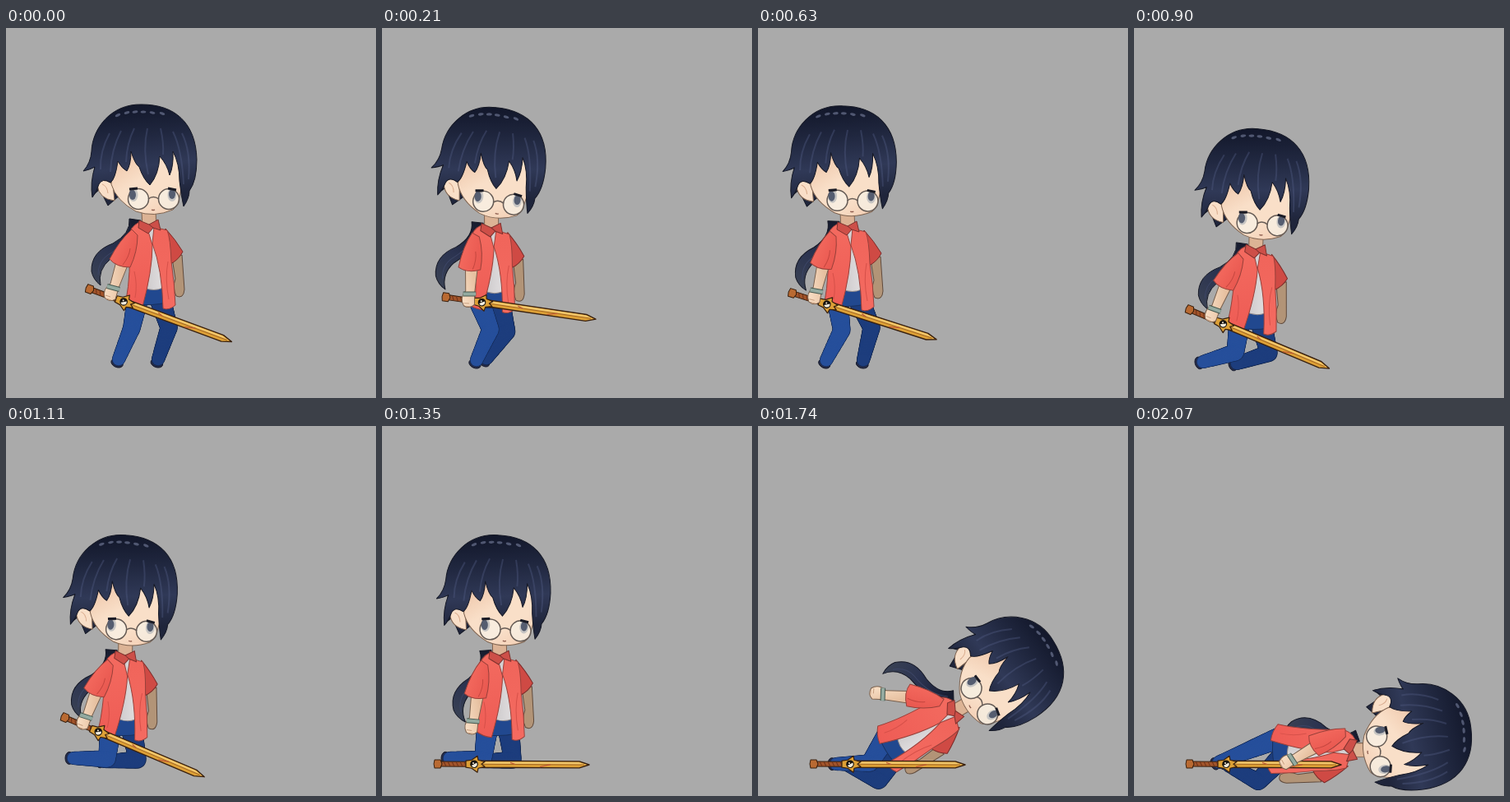
An HTML page with a canvas for the animation above (2.1 s loop, 450 by 450 pixels).

```html
<!DOCTYPE html>
<html lang="en">
<head>
<meta charset="utf-8">
<title>Swordsman falls</title>
<style>
html, body { margin: 0; overflow: hidden; background: #aaa; }
canvas { display: block; width: 100vw; height: 100vh; }
</style>
</head>
<body>
<canvas id="stage" width="450" height="450"></canvas>
<script>
const ctx = document.getElementById('stage').getContext('2d');
const LOOP = 2100, STEP = 30, RAD = Math.PI / 180;

// time, collar x, y, torso turn, head turn, arm turn, tail turn, near ankle x, y, far ankle x, y
const BODY = [
  [0, 174, 238, 0, 0, 0, 0, 137, 403, 185, 403],
  [210, 133, 242, 2, 6, -15, -2, 115, 404, 127, 402],
  [555, 104, 240, 0, 1, -4, -4, 80, 404, 126, 404],
  [630, 109, 240, 0, 1, -5, -6, 83, 404, 128, 404],
  [900, 148, 268, 4, 5, 5, 0, 84, 406, 125, 408],
  [1110, 145, 278, 3, 4, 3, -4, 82, 404, 119, 408],
  [1350, 143, 278, 1, 3, -10, -12, 82, 404, 118, 408],
  [1620, 155, 283, 12, 13, -4, -6, 83, 404, 117, 408],
  [1740, 241, 346, 62, 58, 77, 80, 95, 411, 110, 413],
  [2070, 267, 394, 92, 83, 42, 62, 103, 409, 115, 413]
];
// time, pommel x, y, turn
const SWORD = [
  [0, 100, 317, 20.3],
  [60, 104, 322, 9],
  [210, 76, 327, 8.4],
  [555, 31, 321, 18],
  [630, 40, 322, 17.8],
  [900, 66, 342, 22.8],
  [1110, 70, 354, 23],
  [1200, 66, 411, 0.3]
];

// Monotone cubic interpolation: smooth, never beyond the keys.
function pose(keys, t) {
  const last = keys.length - 1;
  if (t >= keys[last][0]) return keys[last].slice(1);
  const i = keys.findIndex(k => k[0] > t) - 1;
  const a = keys[i], b = keys[i + 1], h = b[0] - a[0], u = (t - a[0]) / h;
  const rate = (n, c) => (keys[n + 1][c] - keys[n][c]) / (keys[n + 1][0] - keys[n][0]);
  const slope = (n, c) => {
    if (n === 0 || n === last) return 0;
    const p = rate(n - 1, c), q = rate(n, c);
    return p * q > 0 ? 2 * p * q / (p + q) : 0;
  };
  return a.slice(1).map((v, j) => {
    const c = j + 1, s = u * u * (3 - 2 * u);
    return v + (b[c] - v) * s + h * u * (1 - u) * ((1 - u) * slope(i, c) - u * slope(i + 1, c));
  });
}

function fill(d, color, edge, width = 1) {
  const p = new Path2D(d);
  ctx.fillStyle = color;
  ctx.fill(p);
  if (edge) line(p, edge, width);
}
function line(d, color, width = 1) {
  ctx.strokeStyle = color;
  ctx.lineWidth = width;
  ctx.stroke(d instanceof Path2D ? d : new Path2D(d));
}
function oval(x, y, rx, ry, color, edge, width = 1, turn = 0) {
  ctx.beginPath();
  ctx.ellipse(x, y, rx, ry, turn, 0, 7);
  if (color) { ctx.fillStyle = color; ctx.fill(); }
  if (edge) { ctx.strokeStyle = edge; ctx.lineWidth = width; ctx.stroke(); }
}
function shade(x0, y0, x1, y1, ...colors) {
  const g = ctx.createLinearGradient(x0, y0, x1, y1);
  colors.forEach((c, i) => g.addColorStop(i / (colors.length - 1), c));
  return g;
}
// Draws a part so that its rest pivot lands on (x, y), turned.
function part(pivot, [x, y], turn, draw) {
  ctx.save();
  ctx.translate(x, y);
  ctx.rotate(turn * RAD);
  ctx.translate(-pivot[0], -pivot[1]);
  draw();
  ctx.restore();
}

function tail() {
  fill('M150 232 Q152 250 130 262 Q103 272 104 296 Q106 306 115 313 Q111 294 127 281 Q160 262 164 234Z',
    shade(155, 235, 110, 310, '#171c2f', '#2b3350', '#3a4254'), '#141724');
  line('M156 240 Q150 262 124 276 Q112 284 112 300', '#3c4566');
}

function farArm() {
  fill('M202 280 L206 305 Q202 316 207 326 Q216 330 217 318 L214 276Z', '#b29477', '#5f4a3c');
  fill('M194 244 Q206 257 215 272 Q210 282 200 287 L190 262Z', '#cf4a44', '#7c2c2a');
}

function nearArm() {
  fill('M134 284 L127 311 Q117 318 120 328 Q126 334 133 330 L137 316 L149 286Z',
    shade(122, 300, 142, 300, '#f7dcc2', '#e6c0a0'), '#79604d');
  line('M121 325 L127 327 M122 329 L128 331', '#c79f80');
  line('M123 314 L138 318', '#46584f', 6);
  line('M123 314 L138 318', '#93aaa0', 4);
  fill('M153 245 Q138 258 126 281 Q134 291 151 291 Q160 272 160 252Z',
    shade(130, 260, 160, 275, '#f56c60', '#e8574f'), '#98403a');
  line('M142 288 Q150 278 151 268', '#c4463f');
}

function torso() {
  fill('M160 312 H194 L195 334 Q178 338 158 336Z', '#21488f', '#17305f');
  fill('M165 222 H182 L183 246 H166Z', '#dcb395', '#7e6350');
  fill('M164 242 L184 242 L191 316 Q180 321 168 316Z', shade(165, 0, 192, 0, '#c9c6c8', '#e2dfe0'), '#8c8688');
  fill('M162 236 Q150 242 150 254 Q152 300 146 331 Q155 338 166 339 Q178 295 178 264 L172 244Z',
    shade(150, 245, 170, 335, '#f36a5f', '#ee5c55'), '#98403a');
  fill('M180 242 L196 246 Q200 256 201 284 Q205 310 206 337 Q198 344 191 341 Q190 294 178 262Z',
    shade(182, 250, 206, 335, '#f0655b', '#f46a60'), '#98403a');
  line('M197 284 Q193 305 198 330 M156 296 Q160 312 157 328', '#d65049');
  fill('M162 234 L174 239 L185 233 L188 246 L179 243 L173 250 L161 243Z', '#cd4f48', '#7d312d');
  line('M174 239 L179 243', '#7d312d');
}

function head() {
  const edge = '#141724', skin = '#f9dfc8';
  fill('M108 165 L105 204 L114 196 L124 216 L140 202Z', '#20263c', edge);
  fill('M130 190 Q113 178 111 191 Q113 208 132 210Z', skin, '#7e6350');
  fill('M132 130 L128 190 Q134 210 158 223 Q180 231 203 221 Q216 212 215 150Z',
    shade(150, 160, 195, 228, '#f1cdb2', skin, skin, '#f3cfb5'), '#7e6350');
  line('M117 190 Q123 192 124 201', '#d9ac8e');
  oval(155, 203, 5.5, 8, '#4d5468');
  oval(202, 203, 5.5, 8, '#4d5468');
  for (const x of [161, 198]) oval(x, 208, 12.5, 12.5, 'rgba(246,241,230,.72)', '#655b55', 1.5);
  oval(154, 203, 4, 6, '#555d70');
  oval(202, 202, 4, 6, '#555d70');
  line('M173 208 Q179 203 186 208', '#655b55', 1.5);
  line('M150 196 L160 195 M197 195 L207 197', '#1a1b25', 3);
  line('M177 221 Q179 222 181 221', '#8b5a4c', 1.3);
  fill('M165 93 C128 92 105 122 104 150 Q103 164 94 174 Q103 172 108 169 Q102 188 105 206' +
    'Q110 200 113 190 Q117 182 127 188 Q133 184 136 162 Q141 171 147 174 Q152 166 152 150' +
    'Q157 166 162 169 Q167 184 175 191 Q186 178 187 156 Q196 166 199 179 Q204 168 203 150' +
    'Q211 165 211 186 Q213 204 216 217 Q223 207 223 198 Q232 186 232 160 C231 115 205 93 165 93Z',
    shade(160, 93, 172, 205, '#12172a', '#20273f', '#303957', '#1f253b'), edge);
  line('M126 128 Q114 150 115 172 M140 125 Q128 148 127 175 M156 122 Q147 140 146 163' +
    'M172 122 Q166 148 173 178 M188 122 Q192 140 191 154 M203 126 Q214 148 216 190 M214 128 Q225 150 222 184',
    'rgba(83,94,132,.38)', 2);
  for (const [x, y] of [[136, 106], [147, 103], [157, 102], [167, 102], [178, 103], [190, 104]])
    oval(x, y, 3.4, 1.6, 'rgba(120,128,158,.6)', null, 1, (x - 165) * .015);
}

function sword() {
  const dark = '#38200f', gold = '#dda036';
  fill('M50 -4 H174 L186 0 L174 4 H50Z', gold, dark, 1.4);
  fill('M52 -3 H173 L183 0 H52Z', '#f1c66a');
  line('M54 0 H180', '#a3641d');
  line('M126 3 L139 0 M90 -2 L96 0', '#c05a35', 1.3);
  fill('M4 -3 H40 V3 H4Z', '#a2542a', dark);
  for (let x = 9; x < 38; x += 5) line(`M${x} -3 l3 6`, '#6b3118');
  fill('M-2 -5 H5 L7 0 L5 5 H-2 L-3 0Z', '#b96a32', dark);
  fill('M36 -4 L43 -5 L50 -10 L51 -5 L59 -3 L55 0 L59 3 L51 5 L50 10 L43 5 L36 4Z', gold, dark, 1.2);
  oval(46, 0, 4.8, 4.8, '#17130f');
  ctx.fillStyle = '#f4eddd';
  ctx.beginPath();
  ctx.arc(46, 0, 3.6, -.5, 2.6);
  ctx.fill();
  oval(45, -1.3, 1, 1, '#f4eddd');
}

// Two-bone leg whose knee always bends forward.
function leg([hx, hy], ax, ay, color, edge) {
  const dx = ax - hx, dy = ay - hy, d = Math.hypot(dx, dy);
  const bend = Math.sqrt(Math.max(0, 41 * 41 - d * d / 4));
  const kx = (hx + ax) / 2 + dy / d * bend, ky = (hy + ay) / 2 - dx / d * bend;
  const turn = Math.atan2(ay - ky, ax - kx);
  oval(ax + 5 * Math.cos(turn), ay + 5 * Math.sin(turn), 5, 7.5, '#262c48', '#161a2c', 1, turn);
  for (const [grow, tone] of [[.8, edge], [0, color]])
    for (let i = 0; i <= 60; i++) {
      const u = i / 30, v = u % 1, thigh = u < 1;
      const x = thigh ? hx + (kx - hx) * u : kx + (ax - kx) * (u - 1);
      const y = thigh ? hy + (ky - hy) * u : ky + (ay - ky) * (u - 1);
      const r = 12.5 - 2.6 * u + grow;
      oval(x, y, r, r, tone);
    }
}

function draw(t) {
  const [cx, cy, lean, nod, swing, wag, nx, ny, fx, fy] = pose(BODY, t);
  const [sx, sy, tilt] = pose(SWORD, t);
  const collar = [174, 238], c = Math.cos(lean * RAD), s = Math.sin(lean * RAD);
  const joint = ([x, y]) => {
    const dx = x - collar[0], dy = y - collar[1];
    return [cx + dx * c - dy * s, cy + dx * s + dy * c];
  };
  const hang = (pivot, turn, shape) => part(pivot, joint(pivot), turn, shape);

  ctx.fillStyle = '#aaa';
  ctx.fillRect(0, 0, 450, 450);
  ctx.lineJoin = 'round';
  hang([158, 234], wag, tail);
  hang([196, 255], lean, farArm);
  leg(joint([186, 325]), fx, fy, '#1d3d7d', '#142850');
  leg(joint([161, 325]), nx, ny, '#264f9b', '#18305f');
  hang(collar, lean, torso);
  hang(collar, nod, head);
  part([0, 0], [sx, sy], tilt, sword);
  hang([155, 252], swing, nearArm);
}

const start = performance.now();
function tick() {
  const t = (performance.now() - start) % LOOP;
  draw(Math.floor(t / STEP) * STEP);
  requestAnimationFrame(tick);
}
tick();
</script>
</body>
</html>
```
